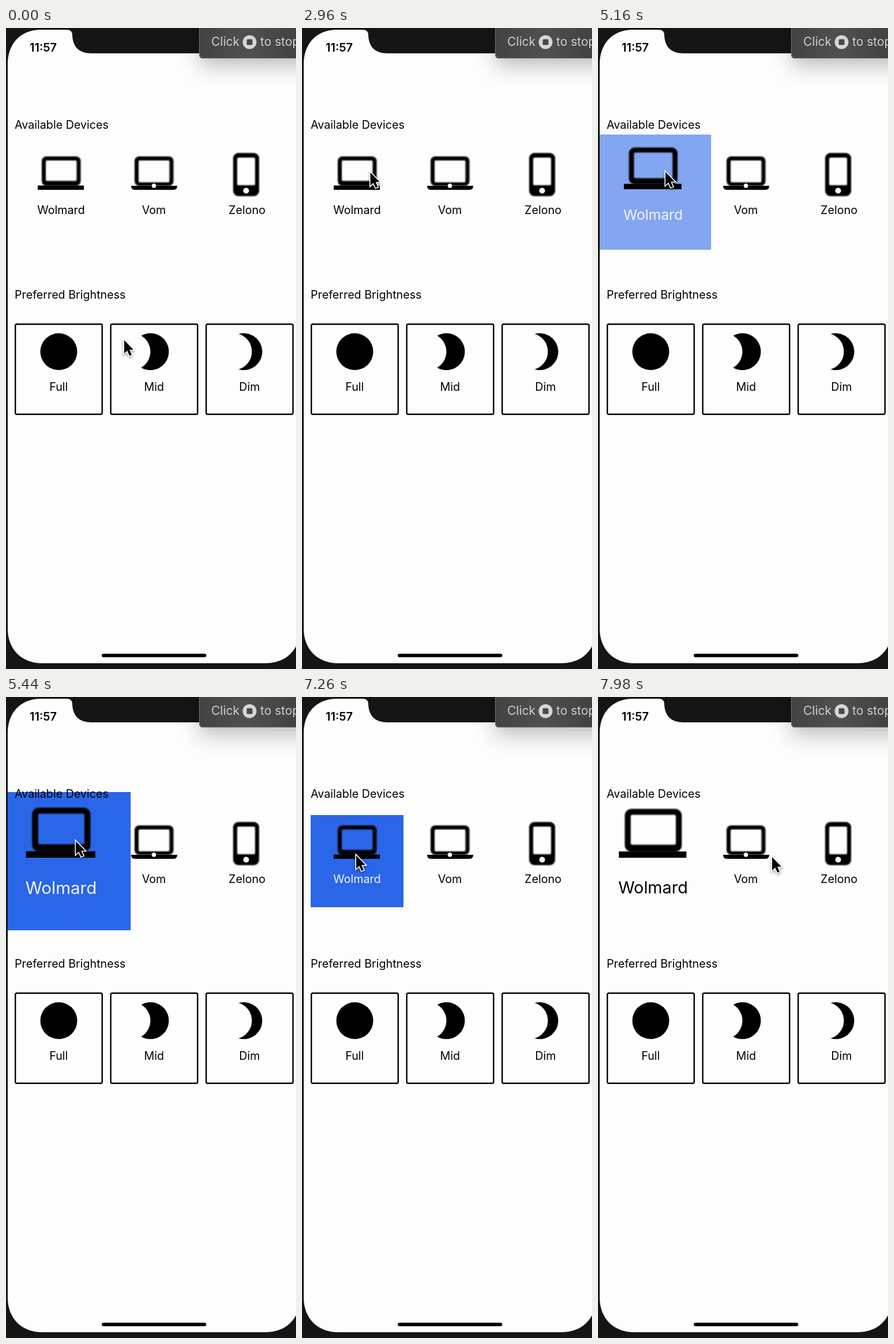
Animation of 503 by 1113 pixels, one loop 8000 ms. Source, as an HTML page with a canvas:

```html
<!DOCTYPE html>
<html lang="en">
<head>
<meta charset="utf-8">
<title>Device picker</title>
<style>
html, body { margin: 0; width: 100%; height: 100%; overflow: hidden; background: #151515; }
canvas { display: block; }
</style>
</head>
<body>
<canvas id="stage" width="503" height="1113"></canvas>
<script>
const ctx = document.getElementById('stage').getContext('2d');
const LOOP = 8000, INK = '#000', PAPER = '#fdfdfd';
const FONT = 'Inter, "Open Sans", sans-serif';

// Pointer stops: time, x, y
const STOPS = [
  [50, 204, 540], [1000, 120, 167], [1560, 120, 167], [2300, 118, 249],
  [4600, 116, 248], [5250, 116, 248], [5900, 137, 249], [6300, 137, 249],
  [7150, 93, 273], [7420, 93, 273], [8000, 301, 276]
];
const SELECT = 4877, DESELECT = 7343, HALF = 566;

const clamp = v => Math.min(1, Math.max(0, v));
const ease = v => (1 - Math.cos(Math.PI * clamp(v))) / 2;

// Three pictures per 140 ms, shown for 20, 20 and 100 ms
function steppedTime(t) {
  const u = t + 20, p = u % 140;
  const k = Math.floor(u / 140) * 3 + (p < 20 ? 0 : p < 40 ? 1 : 2);
  return k * 140 / 3 - 20;
}

function pointerAt(t) {
  let i = 0;
  while (i < STOPS.length - 2 && t > STOPS[i + 1][0]) i++;
  const [t0, x0, y0] = STOPS[i], [t1, x1, y1] = STOPS[i + 1];
  const e = ease((t - t0) / (t1 - t0));
  return [x0 + (x1 - x0) * e, y0 + (y1 - y0) * e];
}

// Grows to 1.5 and returns to 1
function pulse(t, start) {
  const p = (t - start) / HALF;
  return 0.5 * (p < 1 ? ease(p) : 1 - ease(p - 1));
}

function text(str, x, y, { size = 19.7, weight = 400, align = 'left', color = INK } = {}) {
  ctx.font = `${weight} ${size}px ${FONT}`;
  ctx.textAlign = align;
  ctx.fillStyle = color;
  ctx.fillText(str, x, y);
}

function fillPath(build, color = INK, rule = 'nonzero') {
  ctx.beginPath();
  build();
  ctx.fillStyle = color;
  ctx.fill(rule);
}

const disc = (x, y, r, color) => fillPath(() => ctx.arc(x, y, r, 0, 7), color);

// Soft rounded block with a see-through screen
function frame(x, y, w, h, r, ix, iy, iw, ih) {
  ctx.filter = 'blur(0.9px)';
  fillPath(() => {
    ctx.roundRect(x, y, w, h, r);
    ctx.roundRect(ix, iy, iw, ih, 2);
  }, INK, 'evenodd');
  ctx.filter = 'none';
}

function phoneShape() {
  ctx.beginPath();
  ctx.moveTo(3, 63);
  ctx.bezierCurveTo(3, 27, 25, 3, 61, 3);
  ctx.lineTo(106, 3);
  ctx.quadraticCurveTo(115, 3, 115, 13);
  ctx.bezierCurveTo(116, 33, 127, 44, 148, 44);
  ctx.lineTo(510, 44);
  ctx.lineTo(510, 1043);
  ctx.bezierCurveTo(510, 1079, 486, 1103, 450, 1103);
  ctx.lineTo(63, 1103);
  ctx.bezierCurveTo(27, 1103, 3, 1079, 3, 1043);
  ctx.closePath();
}

function firstDevice(t) {
  const scale = 1 + pulse(t, SELECT) + pulse(t, DESELECT);
  const fill = ease((t - SELECT) / HALF) ** 0.8 * (1 - ease((t - DESELECT) / HALF));
  const chosen = t > SELECT && t < DESELECT;
  ctx.save();
  ctx.translate(95.5, 285);
  ctx.scale(scale, scale);
  ctx.translate(-95.5, -285);
  ctx.globalAlpha = fill;
  ctx.fillStyle = '#2a66e8';
  ctx.fillRect(15, 205, 161, 160);
  ctx.globalAlpha = 1;
  frame(62, 223, 67.5, 51, 8, 69, 230, 53.5, 35.5);
  ctx.fillRect(55, 273.5, 80, 7.5);
  text('Wolmard', 95.5, 323, { align: 'center', color: chosen ? '#f1f4fd' : INK });
  ctx.restore();
}

function otherDevices() {
  frame(223, 223, 67.5, 51, 8, 230, 230, 53.5, 38);
  fillPath(() => ctx.roundRect(217, 274, 80, 7, [0, 0, 6, 6]));
  disc(256.5, 274, 3.7, PAPER);
  text('Vom', 256.5, 323, { align: 'center' });

  frame(394, 217, 45, 75, 9, 401, 225, 31, 48);
  disc(416.5, 282.5, 5, PAPER);
  text('Zelono', 418, 323, { align: 'center' });
}

function crescent(x, y, r, shift) {
  const a = Math.acos(shift / 2 / r);
  fillPath(() => {
    ctx.arc(x, y, r, a - Math.PI, Math.PI - a);
    ctx.arc(x - shift, y, r, a, -a, true);
  });
}

function brightness() {
  text('Preferred Brightness', 15, 470);
  ['Full', 'Mid', 'Dim'].forEach((name, i) => {
    const x = 15 + i * 165.5;
    ctx.beginPath();
    ctx.roundRect(x + 1.2, 514.2, 150.6, 156.6, 2.5);
    ctx.strokeStyle = INK;
    ctx.lineWidth = 2.4;
    ctx.stroke();
    text(name, x + 76.3, 630, { align: 'center' });
  });
  disc(91.5, 562, 32, INK);
  crescent(250.5, 562, 32, 32);
  crescent(412.5, 562, 32, 18);
}

function notice() {
  const shade = ctx.createLinearGradient(335, 0, 503, 0);
  shade.addColorStop(0, '#434343');
  shade.addColorStop(0.5, '#505050');
  shade.addColorStop(1, '#424242');
  ctx.save();
  ctx.shadowColor = 'rgba(0,0,0,.26)';
  ctx.shadowBlur = 36;
  ctx.shadowOffsetY = 13;
  fillPath(() => ctx.roundRect(335, -20, 220, 73, 6), shade);
  ctx.restore();
  ctx.strokeStyle = '#777';
  ctx.lineWidth = 1;
  ctx.beginPath();
  ctx.roundRect(335.5, -20, 219, 72.5, 6);
  ctx.stroke();
  const color = '#cecece';
  text('Click', 356, 31, { size: 21, color });
  text('to stop', 441, 31, { size: 21, color });
  disc(422.5, 24.5, 12, '#d6d6d6');
  fillPath(() => ctx.roundRect(417.5, 19.5, 10, 10, 1.5), '#484848');
}

function pointer(x, y) {
  ctx.save();
  ctx.translate(x + 1, y + 2);
  ctx.beginPath();
  [[0, 0], [0, 23], [5.3, 18.2], [9.2, 27], [13, 25.4], [9.2, 16.8], [16, 16.5]]
    .forEach(([px, py]) => ctx.lineTo(px, py));
  ctx.closePath();
  ctx.lineJoin = 'miter';
  ctx.lineWidth = 3.2;
  ctx.strokeStyle = '#fff';
  ctx.shadowColor = 'rgba(0,0,0,.4)';
  ctx.shadowBlur = 4;
  ctx.shadowOffsetY = 2;
  ctx.stroke();
  ctx.shadowColor = 'transparent';
  ctx.fillStyle = INK;
  ctx.fill();
  ctx.restore();
}

function draw(t) {
  ctx.fillStyle = '#151515';
  ctx.fillRect(0, 0, 503, 1113);
  ctx.save();
  phoneShape();
  ctx.fillStyle = PAPER;
  ctx.fill();
  ctx.clip();
  text('11:57', 41, 41, { size: 20, weight: 600 });
  firstDevice(t);
  otherDevices();
  text('Available Devices', 15, 175);
  brightness();
  fillPath(() => ctx.roundRect(166, 1086.5, 181.5, 6, 3));
  ctx.restore();
  notice();
  pointer(...pointerAt(t));
}

const begin = performance.now();
function tick() {
  draw(steppedTime((performance.now() - begin) % LOOP));
  requestAnimationFrame(tick);
}
tick();
</script>
</body>
</html>
```
